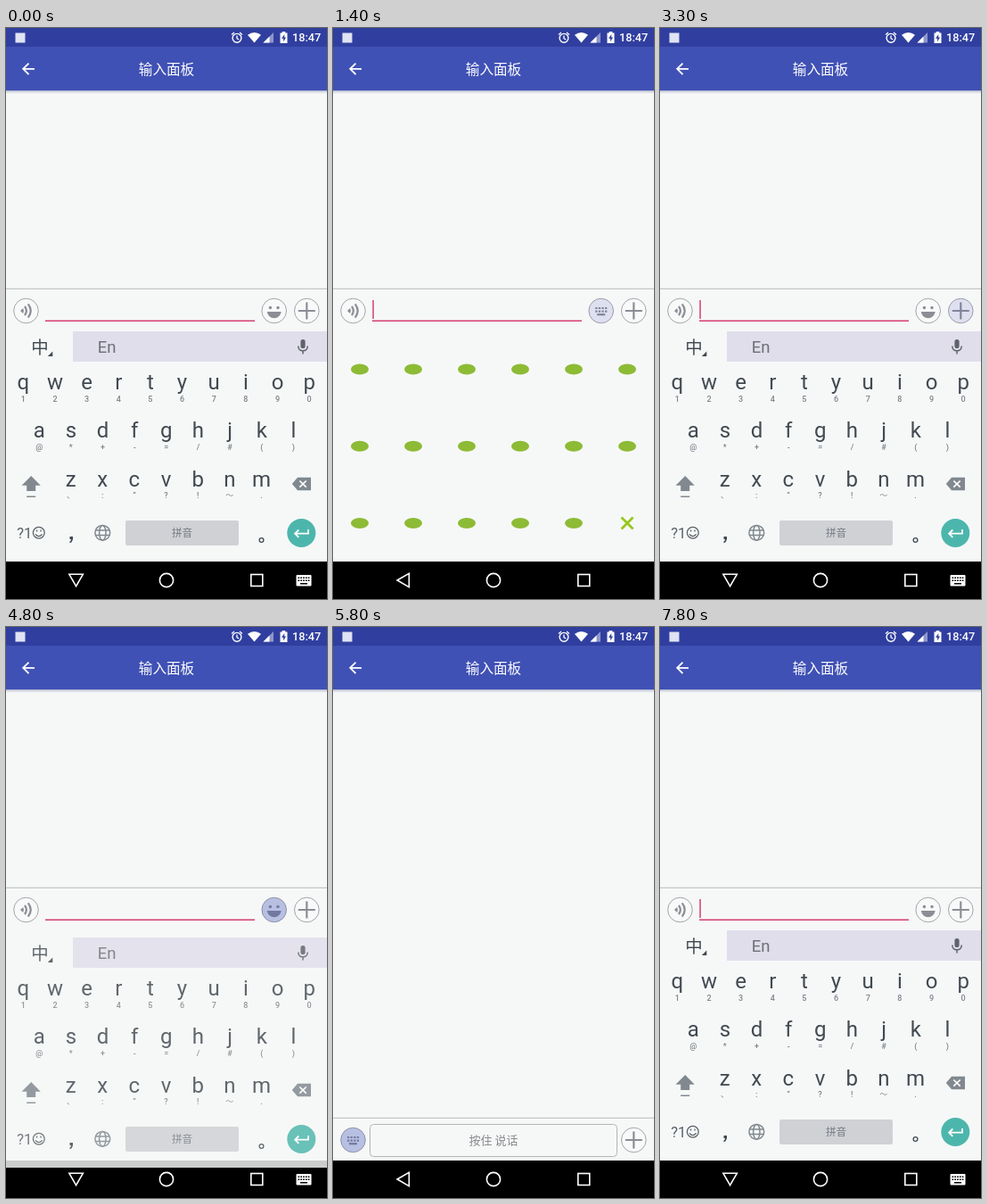
Recreate the animation shown at these times as an HTML page. Size 360 by 640 pixels, loop 7.9 s.

```html
<!DOCTYPE html>
<html lang="zh">
<head>
<meta charset="utf-8">
<title>Input panel</title>
<style>
html, body { margin: 0; width: 100%; height: 100%; overflow: hidden; background: #f6f8f7; }
svg { display: block; width: 360px; height: 640px; }
text { font-family: Roboto, "Noto Sans CJK SC", "Noto Sans CJK", sans-serif; text-anchor: middle; }
.cjk { font-family: "Noto Sans CJK SC", "Noto Sans CJK", sans-serif; }
.letter { font-size: 24px; fill: #424a51; }
.hint { font-size: 9px; font-weight: 500; fill: #7c838a; }
.ring { fill: #f8f9f9; stroke: #a4a4ab; stroke-width: 1; }
.line { fill: none; stroke: #8d8d96; stroke-width: 2.2; }
.solid { fill: #8d8d96; }
.white { fill: none; stroke: #fff; stroke-width: 1.6; }
.ripple { fill: #3f51b5; }
</style>
</head>
<body>
<svg viewBox="0 0 360 640">
  <defs>
    <linearGradient id="shade" x2="0" y2="1">
      <stop stop-color="#8f96b8" stop-opacity=".7"/>
      <stop offset="1" stop-color="#c8ccd4" stop-opacity="0"/>
    </linearGradient>
    <g id="keys">
      <path class="line" stroke-dasharray="2.3 1.3" d="M-6.5-3H6.6M-6.5.6H6.6"/>
      <path class="line" d="M-4.5 4.2H4.5"/>
    </g>
  </defs>

  <rect width="360" height="640" fill="#f6f8f7"/>
  <rect y="70" width="360" height="4" fill="url(#shade)"/>
  <rect width="360" height="70" fill="#4051b5"/>
  <rect width="360" height="21" fill="#303f9f"/>

  <!-- status bar -->
  <rect x="10.5" y="5.5" width="11" height="11" fill="#dfe3f3"/>
  <g class="white" stroke-width="1.3">
    <circle cx="259" cy="11.3" r="4.9" style="stroke-width:1.4"/>
    <path d="M259 8.5V11.7L261.3 13M253 7.4L256 5M265 7.4L262 5" style="stroke-width:1.3"/>
  </g>
  <path fill="#fff" d="M271 7.8Q278.5 2.2 286 7.8L278.5 16.6Z"/>
  <path fill="#8d96cb" d="M288.5 16.5L300 5V16.5Z"/>
  <path fill="#fff" d="M288.5 16.5L295.5 9.5V16.5Z"/>
  <path fill="#fff" d="M307.5 5.5H309.7V4H313.3V5.5H315.5V17H307.5Z"/>
  <path fill="#303f9f" d="M312.3 7L309 11.8H311.1V15.2L314.1 10.4H312.2Z"/>
  <text x="337.2" y="15.3" font-size="12.7" font-weight="500" fill="#fff">18:47</text>

  <!-- title bar -->
  <path class="white" style="stroke-width:1.8" d="M32 45.8H19.5M25.5 39.6L19.2 45.8L25.5 52"/>
  <text class="cjk" x="180" y="51.7" font-size="15.6" fill="#fff">输入面板</text>

  <!-- input bar -->
  <g id="bar">
    <path d="M0 292.3H360" stroke="#c3c7c7" stroke-width="1.3"/>
    <g transform="translate(22.5 317)">
      <circle class="ring" r="13.8"/>
      <g id="voiceIcon">
        <path class="solid" d="M-6.5 0L-3.3-3Q-1.8 0-3.3 3Z"/>
        <path class="line" d="M-1.5-5Q2.3 0-1.5 5M2.3-7.6Q8.2 0 2.3 7.6"/>
      </g>
      <use id="voiceKeys" href="#keys"/>
      <circle id="voiceRipple" class="ripple"/>
    </g>
    <g id="field">
      <path d="M44 328.3H279" stroke="#d63f6e" stroke-width="1.6"/>
      <rect id="cursor" x="44.3" y="305" width="1.5" height="21" fill="#d63f6e"/>
      <g transform="translate(300.7 317)">
        <circle class="ring" r="13.8"/>
        <g id="smile" class="solid">
          <circle cx="-4.3" cy="-3.5" r="1.7"/><circle cx="4.3" cy="-3.5" r="1.7"/>
          <path d="M-8 1H8Q6.5 8.3 0 8.3Q-6.5 8.3-8 1Z"/>
        </g>
        <use id="emojiKeys" href="#keys"/>
        <circle id="emojiRipple" class="ripple"/>
      </g>
    </g>
    <g id="talk">
      <rect x="41.5" y="299.5" width="277" height="36" rx="4" fill="#f6f8f7" stroke="#b2b5b6"/>
      <text class="cjk" x="180" y="321.8" font-size="13" fill="#85888b">按住 说话</text>
    </g>
    <g transform="translate(337.3 317)">
      <circle class="ring" r="13.8"/>
      <path class="line" d="M-9.5 0H9.5M0-9.5V9.5"/>
      <circle id="plusRipple" class="ripple"/>
    </g>
  </g>

  <g id="emojis">
    <path d="M323.5 548.5L336.5 561.5M336.5 548.5L323.5 561.5" stroke="#97c71c" stroke-width="2.8"/>
  </g>

  <rect y="598" width="360" height="42"/>

  <!-- soft keyboard -->
  <g id="board">
    <rect y="340" width="360" height="258" fill="#f6f8f8"/>
    <rect x="75" y="340" width="285" height="34" fill="#e1deec"/>
    <text class="cjk" x="38" y="364.5" font-size="19.5" fill="#424a51">中</text>
    <path d="M52.3 362.5V368H46.8Z" fill="#424a51"/>
    <text x="113" y="364" font-size="18.5" fill="#6c7076">En</text>
    <rect x="330.4" y="349" width="5.2" height="10" rx="2.6" fill="#5f646a"/>
    <path d="M327.7 356.5Q328 361.8 333 361.8Q338 361.8 338.3 356.5M333 362V365.5" fill="none" stroke="#5f646a" stroke-width="1.5"/>
    <path d="M28.2 502L38.8 512.8H33.2V519H23.2V512.8H17.6ZM23.2 524.5H33.2V526H23.2Z" fill="#81898f"/>
    <path d="M327 503.7H342V518.3H327L320.8 511Z" fill="#81898f"/>
    <path d="M329.3 507.5L336.7 514.7M336.7 507.5L329.3 514.7" stroke="#fff" stroke-width="1.7"/>
    <text x="20.8" y="572" font-size="16.5" fill="#5a6167">?1</text>
    <g fill="none" stroke="#5a6167" stroke-width="1.3">
      <circle cx="36.8" cy="565.7" r="6.4"/>
      <path d="M33 567.3Q36.8 572 40.6 567.3M34.6 562.5V564.5M39 562.5V564.5"/>
    </g>
    <path d="M71.5 570H75V573Q74.6 576 71.8 577.2L71.2 576Q73 574.8 73 573H71.5Z" fill="#424a51"/>
    <g fill="none" stroke="#81898f" stroke-width="1.5">
      <circle cx="108.3" cy="565.8" r="8.4"/>
      <ellipse cx="108.3" cy="565.8" rx="3.7" ry="8.4"/>
      <path d="M100.5 563H116.1M100.5 568.6H116.1"/>
    </g>
    <rect x="134" y="552" width="127" height="28" rx="2" fill="#cfd1d5"/>
    <text class="cjk" x="197.5" y="570" font-size="11.5" fill="#747a80">拼音</text>
    <circle cx="286.5" cy="574" r="2.4" fill="none" stroke="#424a51" stroke-width="1.3"/>
    <circle cx="331.3" cy="566" r="16" fill="#4db6ac"/>
    <path class="white" style="stroke-width:1.8" d="M339 562V566.7H324.5M328.3 562.5L324.1 566.7L328.3 570.9"/>
  </g>

  <!-- navigation bar -->
  <path id="back" class="white" d="M72 619L85.3 611.3V626.7Z"/>
  <circle class="white" cx="180" cy="619" r="7.6"/>
  <rect class="white" x="274.8" y="612.5" width="13" height="13"/>
  <g id="navKeys">
    <rect x="325.5" y="613" width="17" height="12.5" rx="1" fill="#fff"/>
    <path d="M327.5 616.3H341M327.5 619.3H341" stroke="#000" stroke-width="1.5" stroke-dasharray="1.7 1.1"/>
    <path d="M330 622.8H338" stroke="#000" stroke-width="1.5"/>
  </g>
</svg>
<script>
const LOOP = 7900, STEP = 100;
const $ = id => document.getElementById(id);

function add(parent, tag, attrs, content = '') {
  const el = document.createElementNS('http://www.w3.org/2000/svg', tag);
  for (const name in attrs) el.setAttribute(name, attrs[name]);
  el.textContent = content;
  parent.append(el);
}

// Letters, hints, first key centre, baseline
const rows = [
  ['qwertyuiop', '1234567890', 19.3, 405],
  ['asdfghjkl', '@*+-=/#()', 37.2, 459],
  ['zxcvbnm', '、:“?!～.', 72.6, 513.5]
];
for (const [letters, hints, x0, y] of rows) {
  [...letters].forEach((letter, i) => {
    const x = x0 + i * 35.65;
    add($('board'), 'text', { class: 'letter', x, y }, letter);
    add($('board'), 'text', { class: 'hint', x, y: y + 13.7 }, hints[i]);
  });
}
for (let i = 0; i < 17; i++) {
  add($('emojis'), 'ellipse', {
    cx: 30 + i % 6 * 60, cy: 382.5 + Math.floor(i / 6) * 86.3, rx: 10, ry: 6, fill: '#8dbb35'
  });
}

// Tap times for each button
const taps = { emoji: [600, 3500, 4500], plus: [2000, 2500], voice: [5600, 6600] };
// Keyboard [offset, opacity] for each step after a tap
const SHOW = [[30, 0], [26, .2], [20, .5], [8, .83], [2, .95], [0, 1]];
const HIDE = [[0, 1], [20, .5], [30, 0]];
const moves = [[0, SHOW, 5], [600, HIDE, 0], [2500, SHOW, 0], [3500, HIDE, 0],
               [4500, SHOW, 0], [5600, HIDE, 0], [6600, SHOW, 0]];

const within = (t, ...spans) => spans.some(([from, to]) => t >= from && t < to);
const show = (id, on) => { $(id).style.display = on ? '' : 'none'; };

function boardPose(t) {
  const [start, poses, skip] = moves.filter(m => m[0] <= t).pop();
  return poses[Math.min(poses.length - 1, skip + (t - start) / STEP)];
}

function ripple(name, t) {
  const start = taps[name].filter(s => s <= t).pop();
  const age = start === undefined ? Infinity : t - start;
  const fade = Math.max(0, Math.min(1, (1050 - age) / 600));
  $(name + 'Ripple').setAttribute('r', Math.min(13.8, 7 + age * .04));
  $(name + 'Ripple').setAttribute('opacity', .34 * fade);
}

function draw(t) {
  const [offset, alpha] = boardPose(t);
  $('board').setAttribute('transform', `translate(0 ${offset})`);
  $('board').setAttribute('opacity', alpha);

  const talking = within(t, [5700, 6700]);
  $('bar').setAttribute('transform', `translate(0 ${talking ? 258 : 0})`);
  show('field', !talking);
  show('voiceIcon', !talking);
  show('talk', talking);
  show('voiceKeys', talking);

  const picking = within(t, [700, 2100], [3600, 4600]);
  show('smile', !picking);
  show('emojiKeys', picking);
  show('emojis', within(t, [900, 2100], [3800, 4600]));

  const blink = t < 6700 ? t + 800 : t - 6700;
  show('cursor', blink % 1000 < 500);

  const typing = within(t, [0, 900], [2700, 3800], [4600, 5800], [6700, LOOP]);
  show('navKeys', typing);
  $('back').setAttribute('transform', typing ? 'rotate(-90 78.6 619)' : '');
  Object.keys(taps).forEach(name => ripple(name, t));
}

const begin = performance.now();
function tick() {
  const t = (performance.now() - begin) % LOOP;
  draw(Math.floor(t / STEP) * STEP);
  requestAnimationFrame(tick);
}
tick();
</script>
</body>
</html>
```
